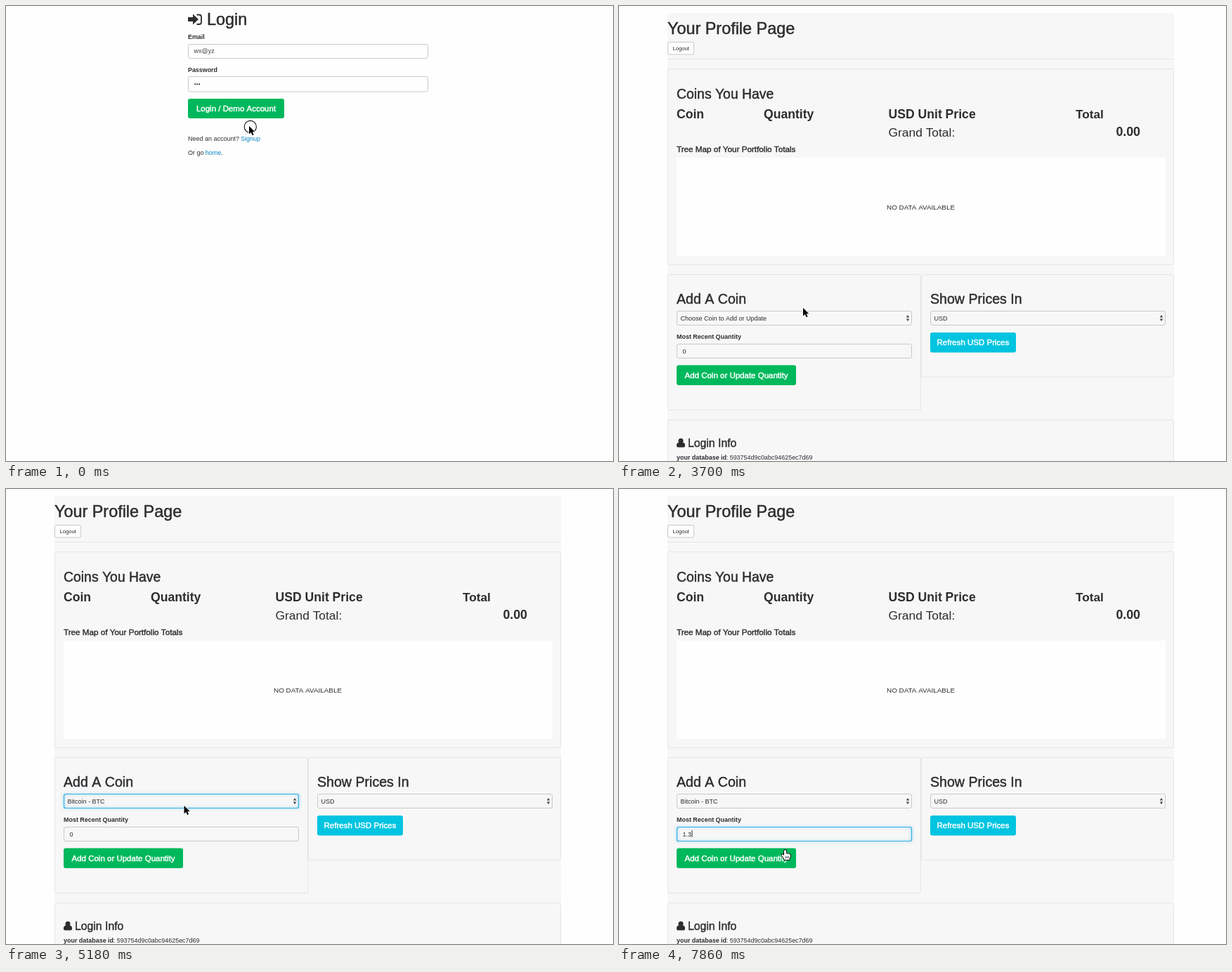
Recreate the animation shown at these times as an HTML page with a canvas. Size 864 px wide and 648 px high, loop 8000 ms.

```html
<!DOCTYPE html>
<html lang="en">
<head>
<meta charset="utf-8">
<title>Coin portfolio demo</title>
<style>
html, body { margin: 0; width: 100%; height: 100%; overflow: hidden; background: #fefefe; }
canvas { display: block; }
</style>
</head>
<body>
<canvas id="stage" width="864" height="648"></canvas>
<script>
const ctx = document.getElementById('stage').getContext('2d');
const LOOP = 8000;
const INK = '#2b2d2f', LINK = '#0a84c1', GREEN = '#00b85c', GREEN_DARK = '#00a14a', CYAN = '#00c4e0';
const PAGE = '#fefefe', PANEL = '#f7f7f7', LINE = '#e5e5e5', FIELD_LINE = '#c9c9c9';
const SANS = '"Liberation Sans", Arial, sans-serif';
const COINS = ['Choose Coin to Add or Update', 'Bitcoin - BTC', 'Ethereum - ETH',
  'DASH - (Formerly DarkCoin)', 'ZCash - ZEC', 'LiteCoin - LTC', 'DogeCoin - DOGE'];

// Cursor steps: time, kind, hot spot
const CURSOR = [
  [0, 'arrow', 346, 171], [140, 'arrow', 346, 166], [290, 'hand', 345, 157],
  [440, 'hand', 345, 148.5], [2670, 'arrow', 344, 149], [3120, 'arrow', 341, 156],
  [3270, 'arrow', 334, 182], [3410, 'arrow', 310, 270], [3560, 'arrow', 276, 372],
  [3700, 'arrow', 262, 430], [3850, 'arrow', 258, 438], [4000, 'arrow', 256, 441],
  [4440, 'arrow', 255, 445], [4590, 'arrow', 254, 449], [4730, 'arrow', 253.5, 451],
  [5480, 'arrow', 247, 469], [5620, 'beam', 237.5, 491],
  [7710, 'arrow', 237, 507], [7860, 'hand', 236.5, 514.5]
];
const CLICKS = [[0, 140], [1340, 1490], [4000, 4150], [5030, 5180], [5920, 6070]];
const QUANTITY = [[0, '0'], [7120, '1'], [7260, '1.'], [7710, '1.3']];
const SELECT_FOCUS = [[0, 0], [4290, 1], [6070, .4], [6220, 0]];
const INPUT_FOCUS = [[0, 0], [5920, .25], [6070, .7], [6220, 1]];

const between = (t, a, b) => t >= a && t < b;
const stepAt = (steps, t) => steps.filter(s => s[0] <= t).pop();

function text(str, x, y, size, { color = INK, bold = false, medium = 0, align = 'left', family = SANS } = {}) {
  ctx.font = `${bold ? 'bold ' : ''}${size}px ${family}`;
  ctx.textAlign = align;
  ctx.fillStyle = color;
  ctx.fillText(str, x, y);
  if (medium) {
    ctx.lineWidth = medium;
    ctx.strokeStyle = color;
    ctx.strokeText(str, x, y);
  }
}

function rect(x, y, w, h, color) {
  ctx.fillStyle = color;
  ctx.fillRect(x, y, w, h);
}

function box(x, y, w, h, radius, fill, line, width = 1) {
  ctx.beginPath();
  ctx.roundRect(x, y, w, h, radius);
  if (fill) { ctx.fillStyle = fill; ctx.fill(); }
  if (line) { ctx.strokeStyle = line; ctx.lineWidth = width; ctx.stroke(); }
}

function shape(points, fill, line, width) {
  ctx.beginPath();
  points.forEach(([x, y]) => ctx.lineTo(x, y));
  ctx.closePath();
  if (line) { ctx.strokeStyle = line; ctx.lineWidth = width; ctx.lineJoin = 'round'; ctx.stroke(); }
  ctx.fillStyle = fill;
  ctx.fill();
}

function button(label, x, y, w, h, color) {
  box(x, y, w, h, 3, color);
  text(label, x + w / 2, y + h / 2 + 4.2, 11.5, { color: '#fff', medium: .45, align: 'center' });
}

function field(x, y, w, h, focus = 0, fill = PANEL) {
  box(x + .5, y + .5, w - 1, h - 1, 2.5, fill, FIELD_LINE);
  if (!focus) return;
  ctx.save();
  ctx.globalAlpha = focus;
  ctx.shadowColor = 'rgba(40,170,235,.7)';
  ctx.shadowBlur = 4;
  box(x + .5, y + .5, w - 1, h - 1, 2.5, null, '#35b2e6', 1.2);
  ctx.restore();
}

function select(label, x, y, w, focus) {
  field(x, y, w, 21, focus);
  text(label, x + 5.5, y + 13.5, 9);
  const cx = x + w - 6, cy = y + 10.5;
  for (const d of [-1, 1])
    shape([[cx - 2.2, cy + d], [cx + 2.2, cy + d], [cx, cy + d * 4.5]], '#444');
}

function loginIcon() {
  shape([[259, 16], [266, 16], [266, 11.5], [274, 19], [266, 26.5], [266, 22], [259, 22]], INK);
  ctx.beginPath();
  ctx.moveTo(271.5, 12.5);
  ctx.lineTo(275, 12.5);
  ctx.quadraticCurveTo(278, 12.5, 278, 15.5);
  ctx.lineTo(278, 23);
  ctx.quadraticCurveTo(278, 26, 275, 26);
  ctx.lineTo(271.5, 26);
  ctx.lineWidth = 1.8;
  ctx.strokeStyle = INK;
  ctx.stroke();
}

function userIcon() {
  box(82, 621.5, 12, 7, [4, 4, 2, 2], INK);
  ctx.beginPath();
  ctx.arc(88, 619.2, 3.5, 0, 7);
  ctx.fill();
}

function loginPage(t) {
  loginIcon();
  text('Login', 286, 27, 23.4, { medium: .5 });
  text('Email', 259, 47, 8.9, { bold: true });
  field(259, 54, 342, 21, 0, PAGE);
  text('wx@yz', 267.5, 67.3, 9, { color: '#444' });
  text('Password', 259, 93.7, 8.9, { bold: true });
  field(259, 100, 342, 22.5, 0, PAGE);
  for (let i = 0; i < 3; i++) {
    ctx.beginPath();
    ctx.arc(269.2 + i * 3, 111.3, 1.1, 0, 7);
    ctx.fillStyle = '#333';
    ctx.fill();
  }
  if (t >= 1340) box(258, 130.5, 139, 31, 2, '#fff', '#58b7f2', 2);
  button('Login / Demo Account', 259, 132, 137, 28, t >= 290 ? GREEN_DARK : GREEN);
  text('Need an account?', 259, 192, 9);
  text('Signup', 334, 192, 9, { color: LINK });
  text('Or go', 259, 211.7, 9);
  text('home', 283.7, 211.7, 9, { color: LINK });
  text('.', 306, 211.7, 9);
}

function summary(t) {
  const y = 159.5, head = { bold: true };
  text('Coins You Have', 82, 131.5, 19.4, { medium: .45 });
  text('Coin', 82, y, 17.6, head);
  text('Quantity', 206, y, 17.6, head);
  text('USD Unit Price', 383.5, y, 17.6, head);
  text('Total', 650, y, 17.2, head);
  text('Grand Total:', 383.5, 185.5, 17.4);
  if (t >= 2530) text('0.00', 742, 185, 17.8, { bold: true, align: 'right' });
  text('Tree Map of Your Portfolio Totals', 82, 208, 11.7, { medium: .4 });
  if (t >= 1930) {
    rect(82, 216, 696, 140, PAGE);
    text('NO DATA AVAILABLE', 429.5, 290, 9.9, { align: 'center' });
  }
}

function profilePage(t) {
  rect(69, 10, 721, 638, PANEL);
  text('Your Profile Page', 69, 39.5, 23.4, { medium: .5 });
  box(69.5, 51.5, 37, 17.5, 2, PAGE, FIELD_LINE);
  text('Logout', 88.2, 63.2, 7.7, { align: 'center' });
  rect(69, 75, 721, 1, LINE);
  [[69, 89, 721, 280], [69, 382, 361, 194], [430, 382, 360, 147], [69, 589, 721, 80]]
    .forEach(([x, y, w, h]) => box(x + .5, y + .5, w - 1, h - 1, 2, null, LINE));
  summary(t);

  text('Add A Coin', 82, 423.5, 19.6, { medium: .45 });
  select(COINS[t >= 5180 ? 1 : 0], 82, 434, 335, stepAt(SELECT_FOCUS, t)[1]);
  text('Most Recent Quantity', 82, 474, 8.95, { bold: true });
  field(82, 481, 335, 21, stepAt(INPUT_FOCUS, t)[1]);
  const quantity = stepAt(QUANTITY, t)[1];
  text(quantity, 90.5, 494.5, 9);
  if (t >= 5920) rect(91 + ctx.measureText(quantity).width, 486, 1, 10, '#333');
  button('Add Coin or Update Quantity', 82, 511.5, 170, 28.5, GREEN);

  text('Show Prices In', 443, 423.5, 19.6, { medium: .45 });
  select('USD', 443, 434, 335, 0);
  button('Refresh USD Prices', 443, 465, 122, 28.5, CYAN);

  userIcon();
  text('Login Info', 98, 627.5, 15.8, { medium: .4 });
  text('your database id', 82, 645.5, 8.95, { bold: true });
  text(': 593754d9c0abc94625ec7d69', 152.7, 645.5, 8.95);
}

function menu(t) {
  const x = 73, y = 432, w = 336.5, h = 95.5, row = 12.65;
  ctx.save();
  ctx.shadowColor = 'rgba(0,0,0,.4)';
  ctx.shadowBlur = 9;
  ctx.shadowOffsetY = 3;
  box(x, y, w, h, 4, '#f1f1f1', '#c4c4c4', .6);
  ctx.restore();

  ctx.save();
  box(x, y, w, h, 4);
  ctx.clip();
  ctx.translate(160, 530);
  ctx.scale(1, .4);
  const tint = ctx.createRadialGradient(0, 0, 50, 0, 0, 115);
  tint.addColorStop(0, 'rgba(190,232,200,.4)');
  tint.addColorStop(1, 'rgba(190,232,200,0)');
  rect(-120, -120, 260, 240, tint);
  ctx.restore();

  const active = t >= 4440 ? 1 : 0;
  rect(x, y + 3.2 + active * row, w, row, '#528ff5');
  COINS.forEach((name, i) => text(name, 91, y + 12.5 + i * row, 8.5,
    { color: i === active ? '#fff' : '#222', family: 'Inter, sans-serif' }));
  ctx.beginPath();
  ctx.moveTo(79, 442);
  ctx.lineTo(81, 444.5);
  ctx.lineTo(84.5, 438.5);
  ctx.lineWidth = 1.2;
  ctx.strokeStyle = active ? '#222' : '#fff';
  ctx.stroke();
}

const drawCursor = {
  arrow() {
    shape([[0, 0], [0, 11.5], [2.7, 9], [4.6, 13.2], [6.6, 12.3], [4.8, 8.2], [8.3, 8.2]], '#000', '#fff', 1.6);
  },
  hand() {
    shape([[-1.5, .5], [0, -.5], [1.5, .5], [1.8, 5], [4, 4.8], [6, 5.6], [7.5, 6.5], [7.5, 9.5],
      [6, 12], [6, 13.5], [-1, 13.5], [-2, 11], [-5, 7.5], [-4.6, 6], [-3, 6], [-1.5, 7.5]], '#fff', '#000', 1.8);
    for (const x of [.8, 2.7, 4.6]) rect(x, 8.5, .7, 3, '#000');
  },
  beam() {
    ctx.beginPath();
    ctx.moveTo(-2.5, -5.5);
    ctx.quadraticCurveTo(0, -5.5, 0, -3.5);
    ctx.lineTo(0, 3.5);
    ctx.quadraticCurveTo(0, 5.5, -2.5, 5.5);
    ctx.moveTo(2.5, -5.5);
    ctx.quadraticCurveTo(0, -5.5, 0, -3.5);
    ctx.moveTo(0, 3.5);
    ctx.quadraticCurveTo(0, 5.5, 2.5, 5.5);
    ctx.moveTo(-1.5, 1.5);
    ctx.lineTo(1.5, 1.5);
    ctx.lineWidth = 1;
    ctx.strokeStyle = '#111';
    ctx.stroke();
  }
};

function cursor(t) {
  const [, kind, x, y] = stepAt(CURSOR, t);
  ctx.save();
  ctx.translate(x, y);
  if (CLICKS.some(([a, b]) => between(t, a, b))) {
    ctx.beginPath();
    ctx.arc(kind === 'beam' ? .5 : 1.8, kind === 'hand' ? 5.5 : kind === 'arrow' ? 1 : 0, 8.6, 0, 7);
    ctx.lineWidth = 1.1;
    ctx.strokeStyle = '#111';
    ctx.stroke();
  }
  drawCursor[kind]();
  ctx.restore();
}

function draw(t) {
  rect(0, 0, 864, 648, PAGE);
  if (t < 1790) loginPage(t);
  else profilePage(t);
  if (between(t, 4150, 5180)) menu(t);
  cursor(t);
}

const start = performance.now();
function tick() {
  draw((performance.now() - start) % LOOP);
  requestAnimationFrame(tick);
}
tick();
</script>
</body>
</html>
```
